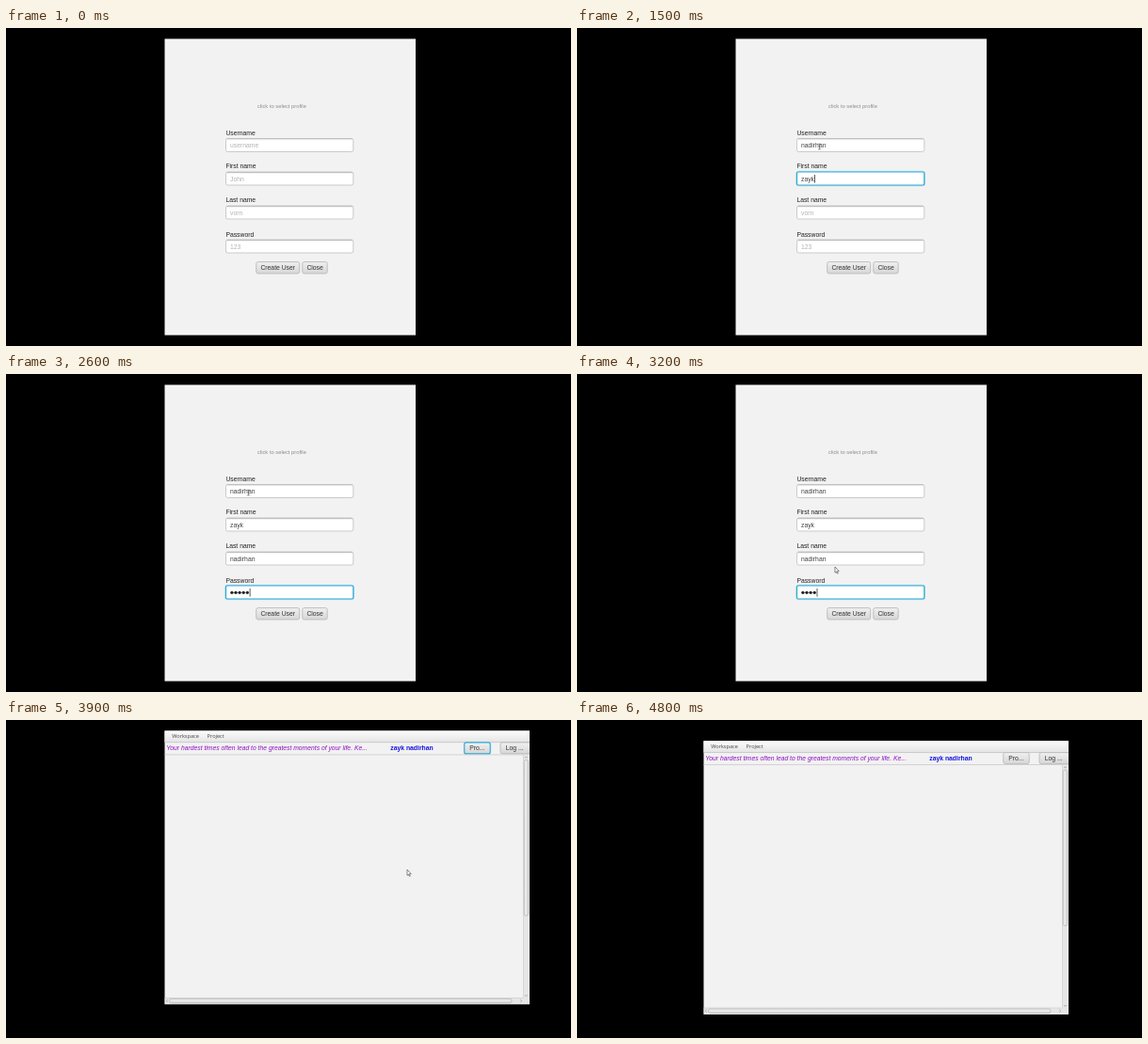
Write an HTML page with a canvas that moves like this. It is 600 by 338 pixels and loops after 5000 ms.

```html
<!DOCTYPE html>
<html lang="en">
<head>
<meta charset="utf-8">
<title>Sign-up form</title>
<style>
  html, body { margin: 0; width: 100%; height: 100%; overflow: hidden; background: #000; }
  canvas { display: block; width: 600px; height: 338px; }
</style>
</head>
<body>
<canvas id="stage" width="600" height="338"></canvas>
<script>
const ctx = document.getElementById('stage').getContext('2d');
const LOOP = 5000, STEP = 100;
const SANS = '"Liberation Sans", Arial, sans-serif';
const MENU = '"Open Sans", "Noto Sans", sans-serif';
const FIRST = 'zayk', LAST = 'nadirhan';
const BLUE = '#2fa9d6';

const fields = [
  { label: 'Username', hint: 'username', labelY: 113.6, y: 117.5, text: LAST },
  { label: 'First name', hint: 'John', labelY: 149, y: 153, text: FIRST },
  { label: 'Last name', hint: 'vorn', labelY: 184.5, y: 189, text: LAST },
  { label: 'Password', hint: '123', labelY: 221.8, y: 225, secret: true }
];

// [time, typed length] for each field
const typing = [
  [[400, 1], [500, 2], [700, 3], [800, 4], [1000, 6], [1100, 7], [1200, 8]],
  [[1400, 2], [1500, 4]],
  [[1700, 2], [1800, 4], [1900, 6], [2100, 8]],
  [[2400, 0], [2500, 3], [2600, 5], [2700, 4]]
];

// [time, focused item]; item 4 is the create button
const focusAt = [[0, -1], [300, 0], [1300, 1], [1600, 2], [2200, 3], [3500, 4]];

// [time, x, y] of the pointer
const pointer = [
  [300, 257.5, 126], [3000, 257.5, 126], [3100, 262, 145], [3200, 274, 205],
  [3300, 284, 276], [3400, 288, 262], [3500, 289, 254], [3600, 291, 252],
  [3700, 331, 212], [3800, 373, 167], [3900, 426, 159], [4000, 428, 110],
  [4100, 424, 55], [4200, 418, 15]
];

function valueAt(keys, t, start) {
  let v = start;
  for (const [time, value] of keys) if (t >= time) v = value;
  return v;
}

function pointerAt(t) {
  if (t < pointer[0][0] || t > pointer[pointer.length - 1][0]) return null;
  const i = pointer.findIndex(k => k[0] >= t);
  const b = pointer[i], a = pointer[Math.max(0, i - 1)];
  const p = b[0] === a[0] ? 0 : (t - a[0]) / (b[0] - a[0]);
  return { x: a[1] + (b[1] - a[1]) * p, y: a[2] + (b[2] - a[2]) * p };
}

function text(str, x, y, color, size = 6.8, style = '', family = SANS) {
  ctx.font = `${style} ${size}px ${family}`;
  ctx.fillStyle = color;
  ctx.fillText(str, x, y);
  return ctx.measureText(str).width;
}

function rect(x, y, w, h, color) {
  ctx.fillStyle = color;
  ctx.fillRect(x, y, w, h);
}

function rounded(x, y, w, h, r, fill, stroke, line = 1) {
  ctx.beginPath();
  ctx.roundRect(x, y, w, h, r);
  if (fill) { ctx.fillStyle = fill; ctx.fill(); }
  if (stroke) { ctx.strokeStyle = stroke; ctx.lineWidth = line; ctx.stroke(); }
}

function fade(x0, y0, x1, y1, from, to) {
  const g = ctx.createLinearGradient(x0, y0, x1, y1);
  g.addColorStop(0, from);
  g.addColorStop(1, to);
  return g;
}

function button(label, x, y, w, h, textX, focused, pressed) {
  const fill = pressed ? fade(0, y, 0, y + h, '#d2d2d2', '#c6c6c6')
                       : fade(0, y, 0, y + h, '#f0f0f0', '#d6d6d6');
  if (focused) rounded(x, y, w, h, 2, null, '#b4deee', 2);
  rounded(x, y, w, h, 2, fill, focused ? BLUE : '#bababa', focused ? 1.1 : 0.9);
  text(label, textX, y + h / 2 + 2.4, '#333');
}

function field(f, index, t, focused) {
  const x = 233.5, w = 135.3, h = 14, count = valueAt(typing[index], t, 0);
  if (focused) {
    rounded(x, f.y, w, h, 2, null, '#b4deee', 2.4);
    rounded(x, f.y, w, h, 1.5, '#fff', BLUE, 1.2);
  } else {
    rounded(x, f.y, w, h, 2, '#fff', '#c6c6c6', 0.9);
    rect(x + 1, f.y, w - 2, 0.9, '#b6b6b6');
    rect(x + 1, f.y + 0.9, w - 2, 0.8, '#ededed');
  }
  text(f.label, 233.4, f.labelY, '#222');

  let end = 238;
  if (!count) {
    if (!focused) text(f.hint, 238, f.y + 9.5, '#b2b2b2');
  } else if (f.secret) {
    ctx.fillStyle = '#222';
    for (let i = 0; i < count; i++) {
      ctx.beginPath();
      ctx.arc(239.9 + i * 4.1, f.y + 7.3, 1.65, 0, Math.PI * 2);
      ctx.fill();
    }
    end += count * 4.1;
  } else {
    end += text(f.text.slice(0, count), 238, f.y + 9.5, '#444');
  }
  if (focused) rect(end + 0.2, f.y + 3, 0.8, 8.6, '#333');
}

function beam(x, y) {
  rect(x - 0.4, y - 2.8, 0.8, 5.6, '#666');
  rect(x - 1.6, y - 3.2, 3.2, 0.7, '#777');
  rect(x - 1.6, y + 2.6, 3.2, 0.7, '#777');
}

function arrow(x, y) {
  ctx.save();
  ctx.translate(x, y);
  ctx.beginPath();
  ctx.moveTo(0, 0);
  for (const [px, py] of [[0, 6.2], [1.4, 5], [2.4, 7.2], [3.3, 6.8], [2.4, 4.6], [4.2, 4.5]]) ctx.lineTo(px, py);
  ctx.closePath();
  ctx.fillStyle = '#fff';
  ctx.fill();
  ctx.strokeStyle = '#555';
  ctx.lineWidth = 0.7;
  ctx.stroke();
  ctx.restore();
}

function form(t) {
  const focus = valueAt(focusAt, t, -1);
  rect(168.5, 11.5, 266.5, 315, '#f2f2f2');
  text('click to select profile', 267, 84.5, '#8c8c8c', 5.8);
  fields.forEach((f, i) => field(f, i, t, focus === i));
  button('Create User', 265.7, 248.6, 46, 12.4, 270.4, focus === 4, focus === 4);
  button('Close', 314.8, 248.6, 26.4, 12.4, 319.4);

  const p = pointerAt(t);
  if (!p) return;
  const inField = p.x < 369 && fields.some(f => p.y > f.y && p.y < f.y + 14);
  (inField ? beam : arrow)(p.x, p.y);
}

function chevron(x, y, angle) {
  ctx.save();
  ctx.translate(x, y);
  ctx.rotate(angle);
  ctx.beginPath();
  ctx.moveTo(-1.3, 0.7);
  ctx.lineTo(0, -0.7);
  ctx.lineTo(1.3, 0.7);
  ctx.strokeStyle = '#999';
  ctx.lineWidth = 0.8;
  ctx.stroke();
  ctx.restore();
}

function scrollbars() {
  rect(549, 37, 7, 265, '#e6e6e6');
  rect(168.5, 295, 387.5, 7, '#e6e6e6');
  rect(549, 37, 0.7, 258, '#cfcfcf');
  rect(168.5, 295, 381, 0.7, '#cfcfcf');
  rounded(550.3, 42.5, 4.4, 165.5, 2, fade(550, 0, 555, 0, '#f2f2f2', '#dadada'), '#b8b8b8', 0.8);
  rounded(173.5, 296.4, 363.5, 4.4, 2, fade(0, 296, 0, 301, '#f2f2f2', '#dadada'), '#b8b8b8', 0.8);
  chevron(552.5, 39.6, 0);
  chevron(552.5, 293, Math.PI);
  chevron(171, 298.6, -Math.PI / 2);
  chevron(547, 298.6, Math.PI / 2);
}

function workspace(t) {
  const [dx, dy] = valueAt([[4300, [-20, 6]], [4400, [-34, 10.7]]], t, [0, 0]);
  const active = t < 4300;
  ctx.save();
  ctx.translate(dx, dy);
  ctx.beginPath();
  ctx.rect(168.5, 11.5, 387.5, 290.8);
  ctx.clip();
  rect(168, 11, 389, 292, '#f2f2f2');
  rect(168, 11, 389, 12.6, fade(0, 11, 0, 24, '#fcfcfc', '#e4e4e4'));
  rect(168, 23.3, 389, 0.8, '#c4c4c4');
  text('Workspace', 176.2, 19.4, '#444', 5.6, '', MENU);
  text('Project', 213.6, 19.4, '#444', 5.6, '', MENU);
  text('Your hardest times often lead to the greatest moments of your life. Ke...', 170.2, 32.2, '#8e10c4', 6.77, 'italic');
  text(FIRST + ' ' + LAST, 408.3, 32.2, '#1414e0', 6.8, 'bold');
  button('Pro...', 486.8, 23.9, 27.4, 12, 492.2, active);
  button('Log ...', 525, 23.9, 34, 12, 530.8);
  rect(168, 36.5, 389, 0.8, '#cbcbcb');
  scrollbars();
  const p = pointerAt(t);
  if (p) arrow(p.x, p.y);
  ctx.restore();
}

function draw(now) {
  const t = Math.floor((now % LOOP) / STEP) * STEP;
  rect(0, 0, 600, 338, '#000');
  (t < 3900 ? form : workspace)(t);
  requestAnimationFrame(draw);
}
requestAnimationFrame(draw);
</script>
</body>
</html>
```
